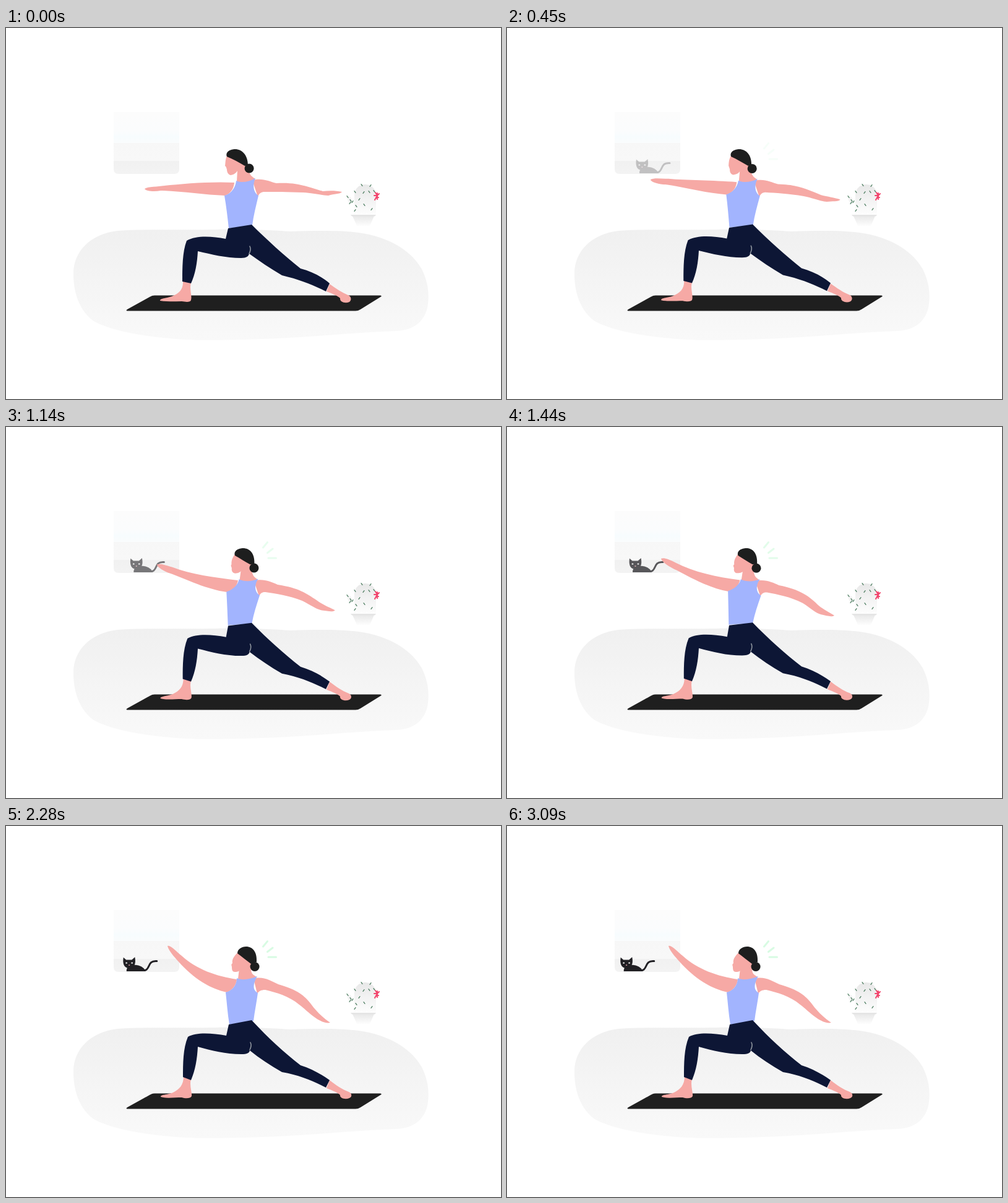
These frames come from a looping animation (800 px wide and 600 px high, 3120 ms). An HTML page:

```html
<!DOCTYPE html>
<html lang="en">
<head>
<meta charset="utf-8">
<title>Yoga at home</title>
<style>
html, body { margin: 0; width: 100%; height: 100%; overflow: hidden; background: #fff; }
svg { display: block; width: 800px; height: 600px; }
</style>
</head>
<body>
<svg viewBox="0 0 800 600">
  <defs>
    <linearGradient id="floor" x2="0" y2="1">
      <stop stop-color="#f0f0f0"/><stop offset="1" stop-color="#f9f9f9"/>
    </linearGradient>
    <linearGradient id="glass" x2="0" y2="1">
      <stop stop-color="#fcfcfc"/><stop offset=".3" stop-color="#fbfcfd"/>
      <stop offset=".4" stop-color="#f7fcfe"/><stop offset=".5" stop-color="#fafcfd"/>
      <stop offset=".5" stop-color="#f7f7f7"/><stop offset=".79" stop-color="#f8f8f8"/>
      <stop offset=".79" stop-color="#f1f1f1"/><stop offset="1" stop-color="#f3f3f3"/>
    </linearGradient>
    <linearGradient id="fade" x2="0" y2="1">
      <stop stop-color="#e8e8e8"/><stop offset="1" stop-color="#fdfdfd"/>
    </linearGradient>
  </defs>

  <path fill="url(#floor)" d="M109 397C109 362 136 333 180 328C220 325 270 327 330 326C390 325 430 327 460 329C500 328 540 327 570 331C620 338 656 361 672 390C682 410 685 432 681 452C676 474 660 489 630 490C560 493 500 499 440 502C390 504 330 506 290 504C230 500 170 491 140 473C116 453 109 425 109 397Z"/>
  <path fill="url(#glass)" d="M174 136H280V228Q280 236 272 236H182Q174 236 174 228Z"/>

  <g id="plant">
    <path fill="url(#fade)" d="M563 301V271C563 247 598 247 598 271V301Z"/>
    <path fill="#f3f3f3" d="M552 274C556 270 560 276 559 284C554 283 551 279 552 274Z"/>
    <path fill="url(#fade)" d="M560 304H595L588 320H567Z"/>
    <path fill="#e5e5e5" d="M557 302H598L596 304.500H559Z"/>
    <path id="spikes" fill="none" stroke="#4c7d60" stroke-width="1.300" stroke-linecap="round"/>
    <path fill="none" stroke="#f2446c" stroke-width="2" stroke-linecap="round" d="M596 278L600 271L597 266M600 271L603 268M600 271L595 271M598 275L602 274M600 277V267"/>
  </g>

  <path fill="#1f1f1f" d="M240 432.500H605Q608 433 606 434.500L573 455Q569 457.500 565 457.500H196Q193 457 196 455L233 434.500Q236 432.500 240 432.500Z"/>

  <g id="cat" fill="#212024">
    <path d="M183.500 212.500L188 216.500H197L202 212C204 222 202 229 193 230C184 230 182 222 183.500 212.500Z"/>
    <path d="M188.500 235C188 227 195 224 205 225C213 226 218.500 231 219 235Z"/>
    <path fill="none" stroke="#212024" stroke-width="3" stroke-linecap="round" d="M218 233.500C227 232 222 217 237.500 218.500"/>
    <path fill="none" stroke="#fff" stroke-width="2" stroke-linecap="round" d="M188 221.500h.8M197 221.500h.8"/>
    <path fill="none" stroke="#e9a9b2" stroke-width="1.500" stroke-linecap="round" d="M192.500 225h.8"/>
  </g>

  <path id="sparks" fill="none" stroke="#d8fbe3" stroke-width="3" stroke-linecap="round" d="M415.500 195L422.500 186.500M422.500 203.500L431 197M424 212H436.500"/>
  <g id="body"></g>
</svg>

<script>
const LOOP = 3120, REACH = 1740, SETTLE = 2010;
const SKIN = '#f6a9a5', TOP = '#a2b4fe', NAVY = '#0d1635', HAIR = '#1d1e1e';
const $ = id => document.getElementById(id);

// Each part: colour, pose at rest, pose at REACH, settled pose (if it differs).
const parts = [
  [SKIN, // front foot
    'M286 408L299 412C296 422 301 432 299 440C298 444 290 443 284 442C272 442 258 443 249 441C248 437 260 437 268 434C280 429 287 423 286 408Z',
    'M287 405L299 409C296 420 301 431 300 437C298 441 290 441 284 439C272 439 258 441 250 438C249 434 262 435 270 431C280 426 287 419 287 405Z'],
  [SKIN, // back foot
    'M523 414L518 426C528 430 536 433 540 437C539 443 548 446 555 443C559 440 558 434 553 432C543 428 533 421 523 414Z',
    'M523 411L518 424C528 428 536 431 540 435C539 440 548 443 555 440C560 438 559 432 554 430C543 426 533 419 523 411Z'],
  [SKIN, // reaching arm
    'M224 260C230 256 245 257 256 255C285 252 330 248 369 250C368 260 363 268 354 271C320 270 285 264 250 263C240 265 226 264 224 260Z',
    'M254 203C260 201 268 207 276 212C305 231 340 241 378 247C376 256 370 262 359 265C330 259 300 240 279 225C270 220 256 210 254 203Z',
    'M261 194C266 192 275 203 284 210C308 232 340 243 373 248C372 258 366 265 357 269C328 263 303 245 283 224C276 216 263 203 261 194Z'],
  [SKIN, // rear arm
    'M398 246C415 242 425 248 437 251C470 249 485 256 512 264C522 263 534 263 543 265C540 269 530 268 521 271C508 270 498 267 480 266C455 265 432 265 416 265C411 266 409 268 407 273Z',
    'M402 250C417 246 430 252 440 257C475 266 486 276 496 288C506 301 518 307 526 313C522 316 514 313 505 310C496 307 490 299 478 289C458 276 438 272 421 268C415 267 412 270 410 274Z',
    'M400 247C414 242 428 250 440 256C472 265 483 275 493 288C503 302 515 312 524 318C517 320 506 315 497 308C490 303 482 295 474 289C456 274 438 270 419 265C412 265 409 267 406 271Z'],
  [SKIN, // neck
    'M374 230L373 248C381 252 394 250 403 244C398 241 394 238 392 230Z',
    'M383 230L380 247C388 252 400 252 409 248C403 244 400 242 400 230Z',
    'M377 230L375 247C383 251 395 249 405 244C398 240 396 238 396 230Z'],
  [TOP,
    'M372 247C380 251 393 249 403 243C398 255 400 266 408 271C404 288 400 303 398 319L360 324C358 306 356 288 353 271C364 268 371 258 372 247Z',
    'M379 246C387 250 399 251 410 247C402 257 403 268 411 273C405 289 400 303 397 317L358 319C358 300 358 283 358 264C368 261 377 254 379 246Z',
    'M373 246C381 250 394 248 406 243C399 256 398 265 407 270C405 285 402 299 400 315L361 321C358 303 357 286 355 269C367 266 373 256 373 246Z'],
  [NAVY,
    'M359 324L397 318C423 344 450 368 476 389C495 394 510 402 523 413L517 426C495 415 475 407 446 400C427 389 410 377 393 365C392 369 389 372 380 372C355 372 332 366 310 361C309 380 306 398 299 413L285 410C285 388 285 362 292 344C308 335 333 337 355 341Z',
    'M359 320L397 316C423 343 450 367 476 387C495 393 510 402 523 411L517 423C495 412 475 403 446 398C427 387 410 376 394 363C393 367 390 369 380 369C355 369 332 363 310 357C309 376 306 395 299 411L286 406C286 384 286 360 294 341C308 333 333 335 356 339Z',
    'M360 321L397 314C423 342 450 367 476 387C495 393 510 402 523 411L517 423C495 412 475 403 446 398C427 387 410 376 394 363C393 367 390 369 380 369C355 369 332 363 310 357C309 376 306 395 299 411L286 406C286 384 286 360 294 341C308 333 333 335 356 339Z'],
  [SKIN, // face
    'M358 205C354 212 355 217 354 223C356 224 356 226 357 229C357 233 359 237 363 238C369 237 372 234 374 231L388 236L390 222Z',
    'M377 205C371 212 369 217 370 222C366 224 369 226 369 228C368 233 370 236 374 236C380 236 382 235 384 233L398 238L404 222Z',
    'M374 205C367 212 365 217 366 222C363 224 365 226 365 228C365 233 366 236 370 236C375 236 376 235 378 233L393 237L400 222Z'],
  [HAIR,
    'M357 208C354 200 363 196 370 196C382 196 391 206 391 222L386 223C376 217 367 212 357 208Z',
    'M377 208C374 200 383 196 390 196C400 196 408 203 407 221L399 222C391 218 385 213 377 208Z',
    'M374 206C374 199 381 195 388 195C399 195 406 204 405 220L396 223C388 217 381 211 374 206Z'],
  [HAIR, 'M393 227L393.1 227', 'M405 228.5L405.1 228.5', 'M402 227.5L402.1 227.5', 15], // bun
  ['#8d939d', 'M394 353C396 357 395 361 393 365', 'M395 350C397 354 396 358 394 362', null, 1.6]
].map(([colour, rest, reach, settled, stroke]) => {
  const el = document.createElementNS('http://www.w3.org/2000/svg', 'path');
  el.setAttribute('fill', stroke ? 'none' : colour);
  if (stroke) {
    el.setAttribute('stroke', colour);
    el.setAttribute('stroke-width', stroke);
    el.setAttribute('stroke-linecap', 'round');
  }
  $('body').append(el);
  return { el, rest, reach, settled: settled || reach };
});

// Blend two paths that share the same commands.
function mix(a, b, k) {
  const ends = b.match(/[\d.]+/g);
  let i = 0;
  return a.replace(/[\d.]+/g, n => (+n + (ends[i++] - n) * k).toFixed(2));
}

// Cactus spines: x, y and slant.
$('spikes').setAttribute('d', [
  [575, 254, 1], [589, 255, -1], [564, 265, 1], [578, 266, -1], [595, 264, 1],
  [552, 273, 1], [571, 277, -1], [557, 279, 1], [556, 283, -1], [566, 288, 1],
  [579, 286, 1], [564, 295, -1], [591, 293, -1], [560, 281, -1], [587, 265, 1]
].map(([x, y, s]) => `M${x - 1} ${y - 1.3 * s}l2 ${2.6 * s}`).join(''));

function draw() {
  const t = performance.now() % LOOP, done = t >= SETTLE;
  for (const p of parts)
    p.el.setAttribute('d', done ? p.settled : mix(p.rest, p.reach, t / REACH));

  const shown = Math.min(1, t / 1950);
  const x = done ? 8.3 * (LOOP - t) / (LOOP - SETTLE) : 30.4 - .011 * t;
  $('cat').setAttribute('transform', `translate(${x})`);
  $('cat').setAttribute('opacity', shown);
  $('sparks').setAttribute('opacity', shown);
  requestAnimationFrame(draw);
}
draw();
</script>
</body>
</html>
```
